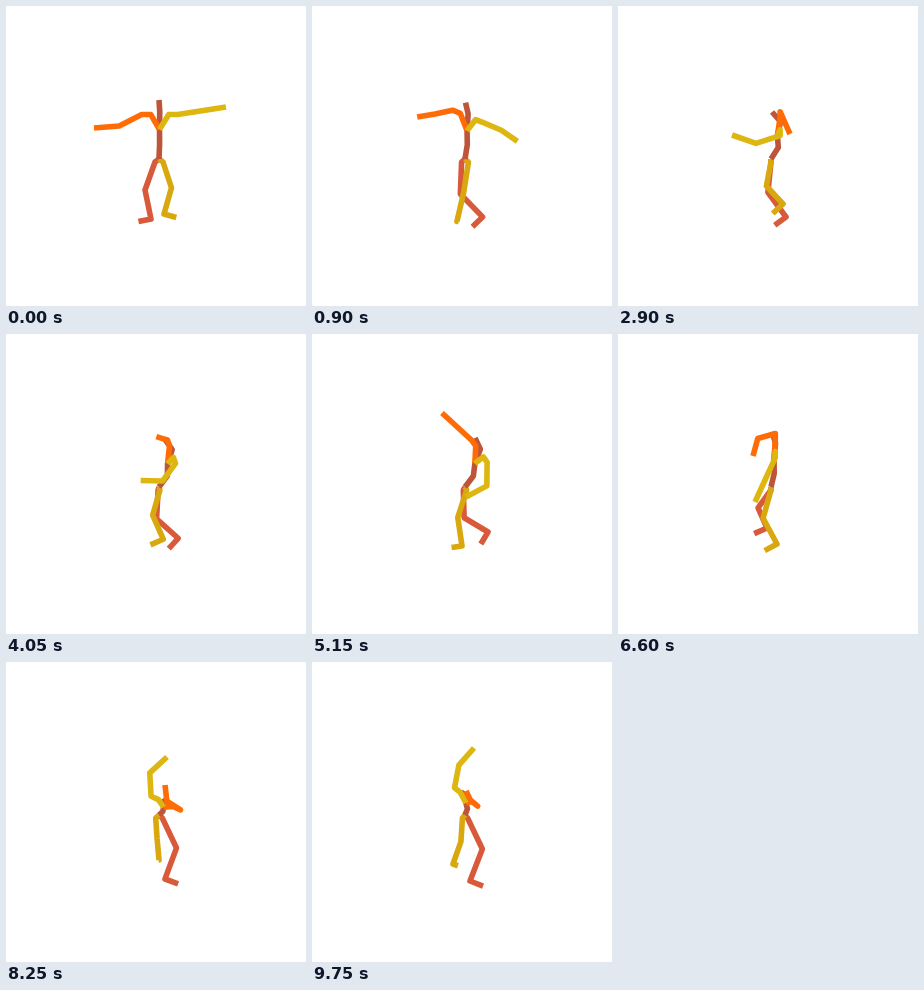
These frames come from a looping animation (300 px wide and 300 px high, 9.8 s). An HTML page:

```html
<!DOCTYPE html>
<html lang="en">
<head>
<meta charset="utf-8">
<title>Dancing stick figure</title>
<style>
  html, body { margin: 0; height: 100%; overflow: hidden; background: #fff; }
  svg { display: block; width: 100vw; height: 100vh; }
  polyline { fill: none; stroke-width: 5.6; stroke-linejoin: round; }
</style>
</head>
<body>
<svg viewBox="0 0 300 300">
  <polyline id="redLeg" stroke="#d9593b"/>
  <polyline id="yellowLeg" stroke="#d8a80e"/>
  <polyline id="spine" stroke="#bd553b"/>
  <polyline id="orangeArm" stroke="#ff6c05"/>
  <polyline id="yellowArm" stroke="#deb610"/>
</svg>
<script>
const LOOP = 9800, STEP = 50, PELVIS = [153, 153];

// Only the head, hands and ankles are posed; a hand is x, y, elbow bend.
// The twist turns the body in degrees: 180 faces the viewer, 270 faces left.
const poses = [
  { time: 0, twist: 180, head: [153, 94], orange: [88, 122, 5], yellow: [220, 101, 0],
    redAnkle: [145, 213], yellowAnkle: [158, 208] },
  { time: 1750, twist: 240, head: [154, 99], orange: [121, 101, -4], yellow: [192, 167, 4],
    redAnkle: [194, 209], yellowAnkle: [133, 222] },
  { time: 2900, twist: 270, head: [154, 106], orange: [172, 128, 0], yellow: [114, 129, 8],
    redAnkle: [168, 211], yellowAnkle: [165, 198] },
  { time: 5150, twist: 245, head: [163, 104], orange: [130, 79, 0], yellow: [154, 163, 12],
    redAnkle: [176, 198], yellowAnkle: [150, 212] },
  { time: 6600, twist: 270, head: [154, 98], orange: [135, 122, -9], yellow: [137, 168, 0],
    redAnkle: [149, 194], yellowAnkle: [159, 210] },
  { time: 8250, twist: 395, head: [158, 136], orange: [159, 123, 7], yellow: [161, 95, 10],
    redAnkle: [159, 217], yellowAnkle: [153, 198] },
  { time: 9750, twist: 410, head: [149, 130], orange: [154, 129, 2], yellow: [162, 86, 6],
    redAnkle: [158, 219], yellowAnkle: [141, 202] }
];

const mix = (a, b, u) => Array.isArray(a) ? a.map((v, i) => mix(v, b[i], u)) : a + (b - a) * u;
const distance = (a, b) => Math.hypot(b[0] - a[0], b[1] - a[1]);

// Moves a point sideways from the line a-b; on a downward line, positive is right.
function offset(point, a, b, amount) {
  const k = amount / (distance(a, b) || 1);
  return [point[0] + (b[1] - a[1]) * k, point[1] - (b[0] - a[0]) * k];
}

const along = (a, b, u, bend) => offset(mix(a, b, u), a, b, bend);

function poseAt(time) {
  const next = Math.max(1, poses.findIndex(pose => pose.time >= time));
  const from = poses[next - 1], to = poses[next];
  const u = (time - from.time) / (to.time - from.time);
  const pose = {};
  for (const part in from) pose[part] = mix(from[part], to[part], u * u * (3 - 2 * u));
  return pose;
}

function show(id, points) {
  document.getElementById(id).setAttribute("points", points.map(p => p.map(v => v.toFixed(2))).join(" "));
}

function draw() {
  const pose = poseAt(Math.floor(performance.now() % LOOP / STEP) * STEP);
  const turn = pose.twist * Math.PI / 180, cos = Math.cos(turn), sin = Math.sin(turn);

  // The back bows more the closer the head comes to the pelvis.
  const reach = distance(pose.head, PELVIS), bow = Math.min((60 - reach) / 2, reach / 8);
  const [neck, chest, waist] = [[0.2, 1.5], [0.5, 1], [0.75, 1.2]]
    .map(([u, k]) => along(pose.head, PELVIS, u, bow * k));
  show("spine", [pose.head, neck, chest, waist, PELVIS]);

  const collar = mix(chest, neck, 0.85);
  function arm(id, side, [x, y, bend]) {
    const shoulder = [collar[0] + side * 18 * cos, collar[1] + side * 12 * sin];
    const elbow = along(shoulder, [x, y], 0.5, bend);
    show(id, [chest, mix(collar, shoulder, 0.5), shoulder, elbow, [x, y]]);
  }

  // The knee points where the body faces, and the foot follows the knee.
  function leg(id, side, ankle) {
    const hip = [PELVIS[0] + side * 4 * cos, PELVIS[1] + 3];
    const bend = 11 * sin + side * 8 * cos;
    const knee = along(hip, ankle, 0.5, bend);
    const foot = Math.max(-14, Math.min(14, 1.6 * bend));
    show(id, [PELVIS, hip, knee, ankle, offset(ankle, knee, ankle, foot)]);
  }

  arm("orangeArm", 1, pose.orange);
  arm("yellowArm", -1, pose.yellow);
  leg("redLeg", 1, pose.redAnkle);
  leg("yellowLeg", -1, pose.yellowAnkle);
  requestAnimationFrame(draw);
}
draw();
</script>
</body>
</html>
```
